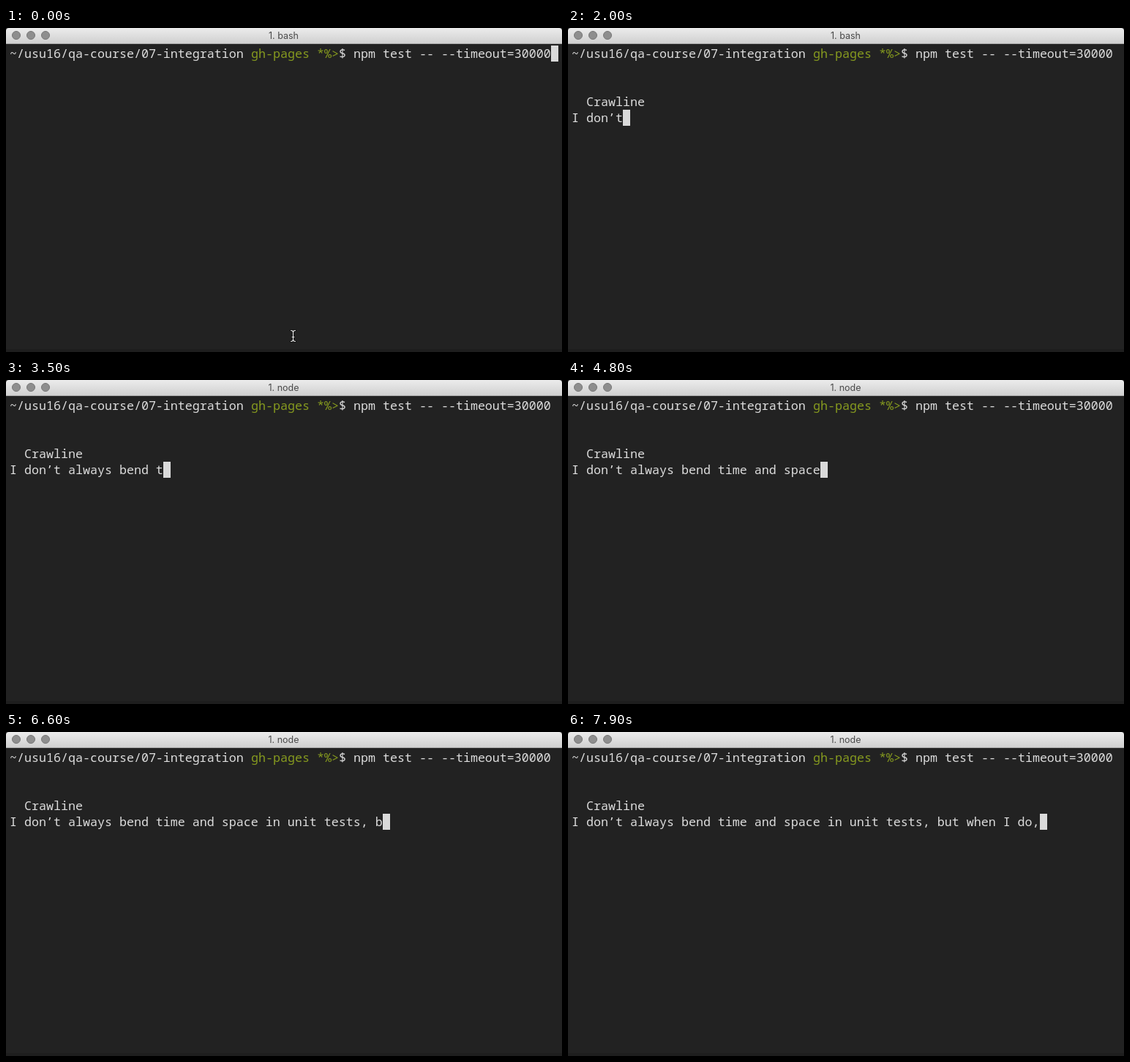
An HTML page for the animation above (8 s loop, 760x444 px).

```html
<!DOCTYPE html>
<html lang="en">
<head>
<meta charset="utf-8">
<title>Terminal</title>
<style>
  html, body { margin: 0; width: 100%; height: 100%; overflow: hidden; background: #222; }
  svg { display: block; width: 760px; height: 444px; }
  .term text {
    font: 500 16.6667px "Noto Sans Mono", "DejaVu Sans Mono", monospace;
    font-variant-ligatures: none;
    white-space: pre;
    fill: #dcdcdc;
  }
  .term .git { fill: #869a1f; }
  .title { font: 12.5px Inter, Roboto, sans-serif; fill: #4a4a4a; text-anchor: middle; }
  .light { fill: #8e8e8e; stroke: #777; }
</style>
</head>
<body>
<svg viewBox="0 0 760 444">
  <defs>
    <linearGradient id="bar" x2="0" y2="1">
      <stop offset="0" stop-color="#ececec"/>
      <stop offset="1" stop-color="#d0d0d0"/>
    </linearGradient>
  </defs>
  <rect width="760" height="444" fill="#222"/>
  <rect y="440" width="760" height="4" fill="#1e1e1e"/>

  <path d="M0 21V4Q0 0 4 0H756Q760 0 760 4V21Z" fill="url(#bar)"/>
  <rect y="21" width="760" height="1" fill="#a9a9a9"/>
  <circle class="light" cx="14" cy="10" r="5.5"/>
  <circle class="light" cx="34" cy="10" r="5.5"/>
  <circle class="light" cx="54" cy="10" r="5.5"/>
  <text class="title" id="title" x="379.5" y="15">1. bash</text>

  <g class="term">
    <text x="5" y="41">~/usu16/qa-course/07-integration</text>
    <text x="335" y="41" class="git">gh-pages *%&gt;</text>
    <text x="455" y="41">$ npm test -- --timeout=30000</text>
    <text x="25" y="107" id="suite">Crawline</text>
    <text x="5" y="129" id="typed"></text>
    <rect id="caret" width="10" height="22" fill="#dadada"/>
  </g>

  <g id="mouse" fill="none" stroke-linecap="round">
    <path id="beam" d="M389.5 414.5Q392.5 414.5 392.5 417V427Q392.5 429.5 389.5 429.5M395.5 414.5Q392.5 414.5 392.5 417M395.5 429.5Q392.5 429.5 392.5 427M391 423.5H394" stroke="#111" stroke-width="2.6"/>
    <use href="#beam" style="stroke:#eee"/>
    <path d="M389.5 414.5Q392.5 414.5 392.5 417V427Q392.5 429.5 389.5 429.5M395.5 414.5Q392.5 414.5 392.5 417M395.5 429.5Q392.5 429.5 392.5 427M391 423.5H394" stroke="#eee" stroke-width="1.1"/>
  </g>
</svg>
<script>
  const LOOP = 8000, TICK = 100;
  const ENTER = 600, OUTPUT = 1340, RENAME = 2300, KEY = 103.5;
  const LINE = "I don’t always bend time and space in unit tests, but when I do,";

  const el = id => document.getElementById(id);
  const [title, suite, typed, caret, mouse] =
    ["title", "suite", "typed", "caret", "mouse"].map(el);

  const show = (node, on) => node.setAttribute("visibility", on ? "visible" : "hidden");

  function moveCaret(col, row) {
    caret.setAttribute("x", 5 + col * 10);
    caret.setAttribute("y", 24 + row * 22);
  }

  function draw(t) {
    const count = t < OUTPUT ? 0 : Math.min(LINE.length, Math.floor((t - OUTPUT) / KEY) + 1);
    title.textContent = t < RENAME ? "1. bash" : "1. node";
    typed.textContent = LINE.slice(0, count);
    show(suite, count > 0);
    show(mouse, t < ENTER);
    if (t < ENTER) moveCaret(74, 0);
    else if (!count) moveCaret(0, 1);
    else moveCaret(count, 4);
  }

  const start = performance.now();
  let last = -1;

  function frame() {
    const t = Math.floor((performance.now() - start) % LOOP / TICK) * TICK;
    if (t !== last) draw(last = t);
    requestAnimationFrame(frame);
  }
  frame();
</script>
</body>
</html>
```
